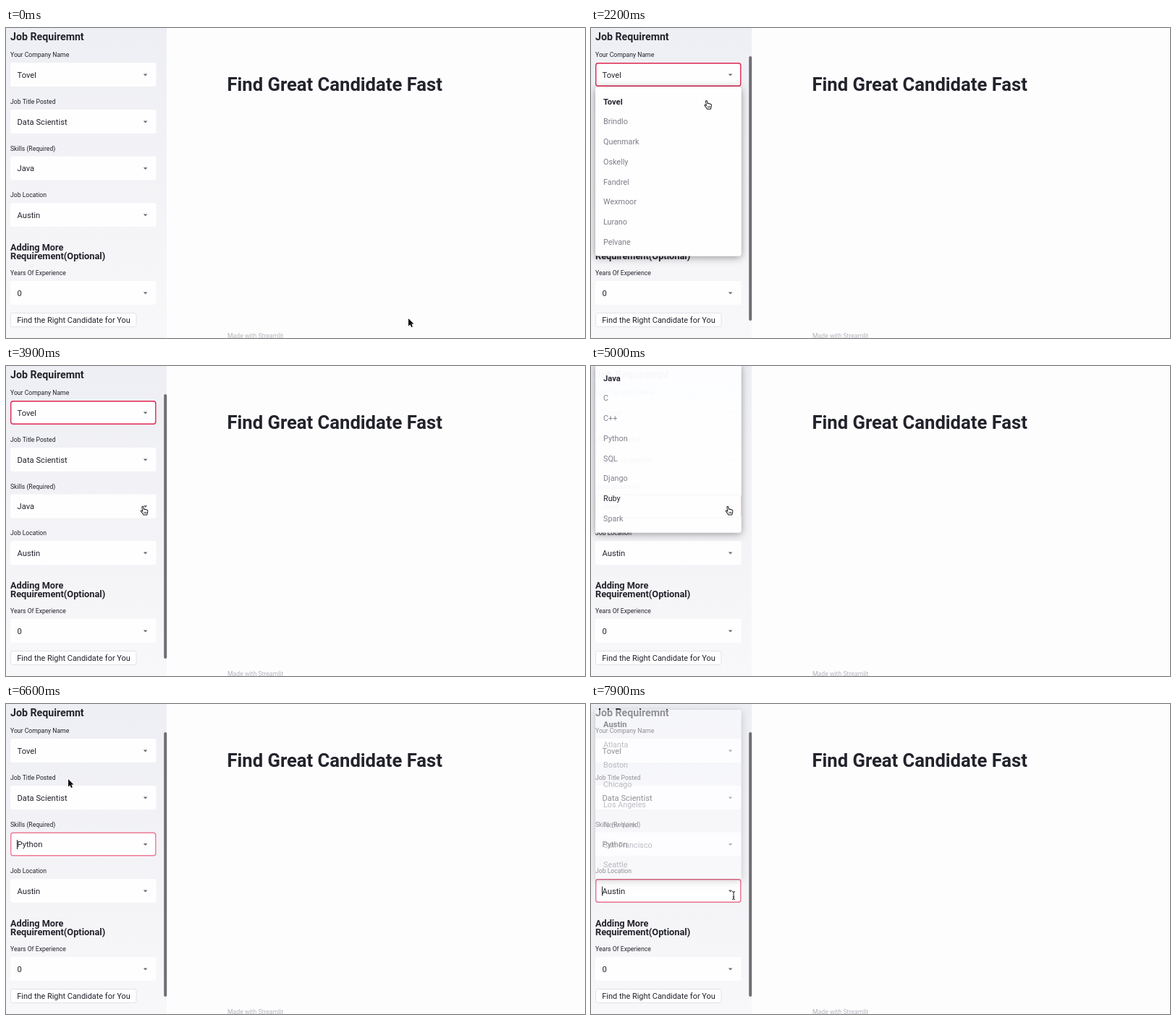
These frames come from a looping animation (800 px wide and 429 px high, 8000 ms). An HTML page with a canvas:

```html
<!DOCTYPE html>
<html lang="en">
<head>
<meta charset="utf-8">
<title>Find Great Candidate Fast</title>
<style>
  html, body { margin: 0; width: 100%; height: 100%; overflow: hidden; background: #fdfdfe; }
  canvas { display: block; width: 800px; height: 429px; }
</style>
</head>
<body>
<canvas id="stage" width="800" height="429"></canvas>
<script>
const ctx = document.getElementById('stage').getContext('2d');
const LOOP = 8000, STEP = 100;
const INK = '#22232b', FAMILY = 'Roboto, "Open Sans", sans-serif';
const BOX = { x: 6, w: 201.5, h: 33 };
const ROW = 27.75, PAD = 6;

const fields = [
  { label: 'Your Company Name', y: 48, value: () => 'Tovel' },
  { label: 'Job Title Posted', y: 113, value: () => 'Data Scientist' },
  { label: 'Skills (Required)', y: 177.5, value: t => t < 6600 ? 'Java' : 'Python' },
  { label: 'Job Location', y: 242, value: () => 'Austin' },
  { label: 'Years Of Experience', y: 350, value: () => '0' }
];

const menus = [
  { from: 1500, to: 2700, top: 81.5,
    items: ['Tovel', 'Brindlo', 'Quenmark', 'Oskelly', 'Fandrel', 'Wexmoor', 'Lurano', 'Pelvane'] },
  { from: 4900, to: 6600, top: -3.5,
    items: ['Java', 'C', 'C++', 'Python', 'SQL', 'Django', 'Ruby', 'Spark'] },
  { from: 7900, to: 8000, top: 8,
    items: ['Austin', 'Atlanta', 'Boston', 'Chicago', 'Los Angeles', 'New York', 'San Francisco', 'Seattle'] }
];

// field, start, end, strength of the first step
const focus = [[0, 1400, 4900, .33], [2, 4900, 6600, .6], [2, 6600, 7900, .6], [3, 7900, 8000, .65]];

// field, start, end
const carets = [
  [0, 1400, 1900], [0, 2300, 2700], [0, 3400, 3800], [0, 4300, 4700],
  [2, 6600, 7000], [2, 7500, 7900], [3, 7900, 8000]
];

// time, x, y, pointer shape from then on
const path = [
  [0, 556, 402, 'arrow'], [100, 384, 279, 'arrow'], [300, 384, 279, 'none'],
  [500, 206, 30, 'arrow'], [800, 199, 56, 'hand'], [1100, 196.5, 71, 'hand'],
  [1900, 196.5, 71, 'hand'], [2300, 150, 118, 'hand'], [2600, 104, 109, 'hand'],
  [2800, 86, 126, 'beam'], [3000, 81, 135, 'beam'], [3200, 92, 145, 'beam'],
  [3400, 130, 168, 'arrow'], [3600, 176, 192, 'beam'], [3800, 190, 199, 'beam'],
  [3900, 191, 200, 'hand'], [5000, 191, 200, 'hand'], [5700, 150, 171, 'hand'],
  [6100, 104, 56, 'hand'], [6400, 88, 110, 'hand'], [6500, 88, 110, 'hand'],
  [6600, 86, 104, 'arrow'], [6800, 92, 122, 'beam'], [7100, 140, 205, 'arrow'],
  [7400, 188, 280, 'arrow'], [7500, 192, 274, 'beam'], [7700, 197, 265, 'beam'],
  [8000, 197, 265, 'beam']
];

const clamp = v => Math.max(0, Math.min(1, v));

function text(str, x, y, size, color = INK, weight = 400) {
  ctx.font = `${weight} ${size}px ${FAMILY}`;
  ctx.fillStyle = color;
  ctx.fillText(str, x, y);
}

function rounded(x, y, w, h, r, fill, stroke, line = 1) {
  ctx.beginPath();
  ctx.roundRect(x, y, w, h, r);
  if (fill) { ctx.fillStyle = fill; ctx.fill(); }
  if (stroke) { ctx.strokeStyle = stroke; ctx.lineWidth = line; ctx.stroke(); }
}

function shape(points, fill) {
  ctx.beginPath();
  points.forEach(([x, y]) => ctx.lineTo(x, y));
  ctx.closePath();
  ctx.fillStyle = fill;
  ctx.fill();
}

function pointerAt(t) {
  const i = path.findLastIndex(p => p[0] <= t);
  const [t0, x, y, kind] = path[i];
  const [t1, x1, y1] = path[i + 1] || path[i];
  const k = t1 > t0 ? (t - t0) / (t1 - t0) : 0;
  return { x: x + (x1 - x) * k, y: y + (y1 - y) * k, kind };
}

function drawPage() {
  ctx.fillStyle = '#fdfdfe';
  ctx.fillRect(0, 0, 800, 429);
  const shade = ctx.createLinearGradient(0, 0, 0, 429);
  shade.addColorStop(0, '#eeeff4');
  shade.addColorStop(1, '#f8f7f9');
  ctx.fillStyle = shade;
  ctx.fillRect(0, 0, 222, 429);

  text('Find Great Candidate Fast', 305.5, 87, 25.6, INK, 700);
  text('Made with Streamlit', 306, 429.3, 8.7, '#b6b7be');
  text('Job Requiremnt', 6, 17.3, 14.2, INK, 700);
  text('Adding More', 6, 307.5, 12.7, INK, 700);
  text('Requirement(Optional)', 6, 319.8, 12.8, INK, 700);
  rounded(6.5, 394.5, 173.5, 19, 3, '#fefeff', '#e2e3e8');
  text('Find the Right Candidate for You', 15.3, 408, 10.93);
}

function drawField({ label, y, value }, t) {
  text(label, 6, y - 8, 8.65);
  rounded(BOX.x, y, BOX.w, BOX.h, 3, '#fefeff');
  text(value(t), 15.5, y + 20.6, 11.2);
  shape([[189.8, y + 15.6], [195.4, y + 15.6], [192.6, y + 18.6]], '#686971');
}

function drawFocus(t) {
  for (const [id, from, to, first] of focus) {
    if (t < from || t >= to) continue;
    const alpha = clamp(first + (t - from) / 250);
    rounded(BOX.x + .7, fields[id].y + .7, BOX.w - 1.4, BOX.h - 1.4, 3, null, `rgba(224,36,79,${alpha})`, 1.4);
  }
  for (const [id, from, to] of carets) {
    if (t < from || t >= to) continue;
    ctx.fillStyle = INK;
    ctx.fillRect(15, fields[id].y + 10.5, 1, 13);
  }
}

function drawScrollbar(t) {
  if (t < 500 || (t >= 5000 && t < 6600)) return;
  ctx.globalAlpha = clamp((t - 400) / 200);
  rounded(218.2, 39, 4, 366, 2, '#6f6f73');
  ctx.globalAlpha = 1;
}

// shadow only outside the panel, so a fading panel stays clear inside
function drawPanel(top, height) {
  ctx.save();
  ctx.beginPath();
  ctx.rect(0, -20, 800, 469);
  ctx.roundRect(BOX.x, top, BOX.w, height, 3);
  ctx.clip('evenodd');
  ctx.shadowColor = 'rgba(0,0,0,.4)';
  ctx.shadowBlur = 11;
  ctx.shadowOffsetY = 2;
  rounded(BOX.x, top, BOX.w, height, 3, '#fefeff');
  ctx.restore();
  rounded(BOX.x, top, BOX.w, height, 3, '#fefeff');
}

function drawMenu({ from, to, top, items }, t, pointer) {
  if (t < from || t >= to) return;
  ctx.save();
  ctx.globalAlpha = 1 - .5 * Math.pow(.06, (t - from) / STEP);
  drawPanel(top, items.length * ROW + 2 * PAD);
  const over = pointer.kind === 'hand' ? Math.floor((pointer.y - 6 - top - PAD) / ROW) : -1;
  items.forEach((item, i) => {
    const color = i === 0 || i === over ? INK : '#7c7e87';
    text(item, 17, top + 24 + i * ROW, i ? 10.8 : 11.2, color, i ? 400 : 700);
  });
  ctx.restore();
}

const pointers = {
  arrow() {
    const p = new Path2D('M0 0V10.4L2.4 8.2L4 12L5.9 11.2L4.3 7.5H7.5Z');
    ctx.lineWidth = 1.4;
    ctx.strokeStyle = '#fff';
    ctx.stroke(p);
    ctx.fillStyle = '#0b0b0d';
    ctx.fill(p);
  },
  hand() {
    ctx.scale(.88, .92);
    const p = new Path2D('M-3.6 -5.2C-3.6 -6.7 -1.6 -6.7 -1.4 -5.2L-.6 -1.7C.1 -2.6 1.5 -2.4 1.8 -1.4C2.5 -2 3.5 -1.7 3.8 -.8C4.7 -1.2 5.5 -.5 5.5 .6C5.6 3 5 4.2 4.2 6.4H-1.4C-2.2 4.5 -3.8 3 -5.2 1.4C-6 .2 -4.6 -.6 -3.5 .3L-2.5 1.2Z');
    ctx.fillStyle = '#fff';
    ctx.fill(p);
    ctx.strokeStyle = '#17171a';
    ctx.lineWidth = 1.1;
    ctx.lineJoin = 'round';
    ctx.stroke(p);
    ctx.lineWidth = .8;
    ctx.stroke(new Path2D('M-.1 2V4.6M1.6 2V4.6M3.3 2V4.6'));
  },
  beam() {
    const p = new Path2D('M-2 -5.5Q0 -5.5 0 -4Q0 -5.5 2 -5.5M0 -4.3V4.3M-2 5.5Q0 5.5 0 4Q0 5.5 2 5.5M-1.2 2H1.2');
    ctx.strokeStyle = '#fff';
    ctx.lineWidth = 2.2;
    ctx.stroke(p);
    ctx.strokeStyle = '#1c1c20';
    ctx.lineWidth = 1;
    ctx.stroke(p);
  },
  none() {}
};

function draw(t) {
  const pointer = pointerAt(t);
  drawPage();
  fields.forEach(f => drawField(f, t));
  drawFocus(t);
  drawScrollbar(t);
  menus.forEach(m => drawMenu(m, t, pointer));
  ctx.save();
  ctx.translate(pointer.x, pointer.y);
  pointers[pointer.kind]();
  ctx.restore();
}

const start = performance.now();
function tick() {
  const t = (performance.now() - start) % LOOP;
  draw(Math.floor(t / STEP) * STEP);
  requestAnimationFrame(tick);
}
tick();
</script>
</body>
</html>
```
